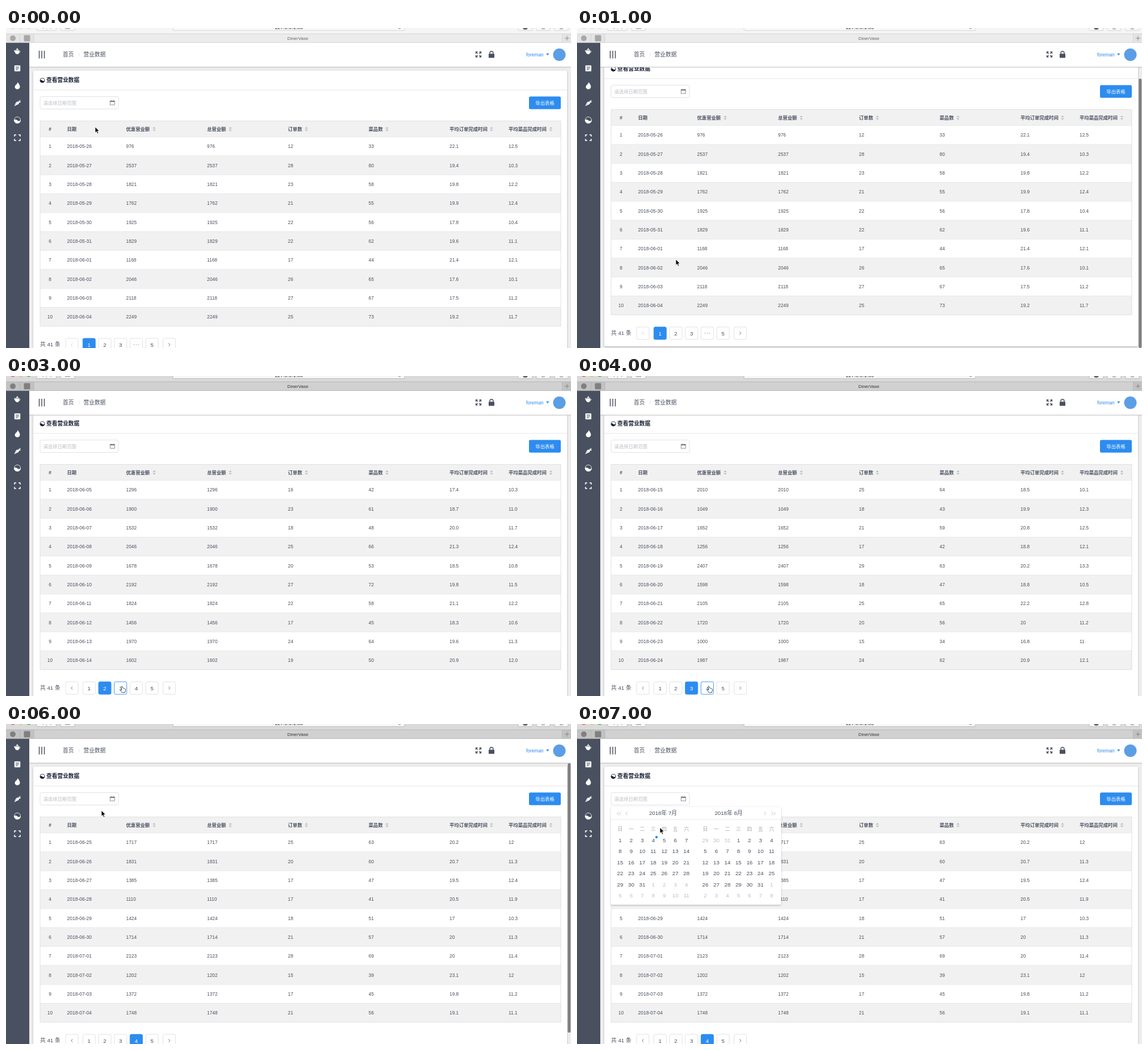
Write an HTML page that moves like this. It is 995x563 px and loops after 8000 ms.

```html
<!DOCTYPE html>
<html lang="zh">
<head>
<meta charset="utf-8">
<title>营业数据</title>
<style>
html, body { margin: 0; width: 100%; height: 100%; overflow: hidden; background: #eee; }
svg { display: block; width: 995px; height: 563px; font-family: "Liberation Sans", "Noto Sans CJK SC", "Noto Sans CJK", sans-serif; }
</style>
</head>
<body>
<svg id="stage" viewBox="0 0 995 563">
  <defs>
    <filter id="soft" x="-5%" y="-10%" width="110%" height="125%">
      <feDropShadow dx="0" dy="1" stdDeviation="1.6" flood-opacity=".28"/>
    </filter>
  </defs>
  <g id="view"></g>
</svg>
<script>
const INK = '#495060', BLUE = '#2d8cf0', PALE = '#bbbec4', LINE = '#dddee1', STRIPE = '#f1f1f1';
const SMALL = 8.36, MEDIUM = 9.72, ROW = 33.32;

// One state per second; scroll moves the page, bar is the scrollbar top.
const states = [
  { page: 1, scroll: 0, cursor: [157, 174], blurred: true },
  { page: 1, scroll: 20, cursor: [174, 407], bar: 89, blurred: true },
  { page: 1, scroll: 8, cursor: [176, 547], noIcons: true },
  { page: 2, scroll: 8, cursor: [205, 551], hand: true, hover: 3 },
  { page: 3, scroll: 8, cursor: [233, 551], hand: true, hover: 4 },
  { page: 4, scroll: -2, cursor: [202, 272], bar: 69, hoverRow: 2 },
  { page: 4, scroll: 0, cursor: [168, 152], bar: 69 },
  { page: 4, scroll: 0, cursor: [146, 182], picker: true },
];

// Columns: turnover, orders, dishes, order time, dish time.
const parse = text => text.split(';').map(row => row.trim().split(' '));
const pages = {
  1: parse('976 12 33 22.1 12.5;2537 28 80 19.4 10.3;1821 23 58 19.8 12.2;1762 21 55 19.9 12.4;1925 22 56 17.8 10.4;1829 22 62 19.6 11.1;1168 17 44 21.4 12.1;2046 26 65 17.6 10.1;2118 27 67 17.5 11.2;2249 25 73 19.2 11.7'),
  2: Array.from({ length: 10 }, (_, i) => {
    const orders = 16 + i * 7 % 12;
    return [orders * 81 + i * 37 % 90, orders, Math.round(orders * 2.65), (17.4 + i * 13 % 41 / 10).toFixed(1), (10.3 + i * 7 % 23 / 10).toFixed(1)];
  }),
  3: parse('2010 25 64 18.5 10.1;1049 18 43 19.9 12.3;1652 21 59 20.8 12.5;1256 17 42 18.8 12.1;2407 29 63 20.2 13.3;1598 18 47 18.8 10.5;2105 25 65 22.2 12.8;1720 20 56 20 11.2;1000 15 34 16.8 11;1987 24 62 20.9 12.1'),
  4: parse('1717 25 63 20.2 12;1831 20 60 20.7 11.3;1385 17 47 19.5 12.4;1110 17 41 20.5 11.9;1424 18 51 17 10.3;1714 21 57 20 11.3;2123 28 69 20 11.4;1202 15 39 23.1 12;1372 17 45 19.8 11.2;1748 21 56 19.1 11.1'),
};
const columns = [[107.5, '日期'], [211.5, '优惠营业额', 261], [354, '总营业额', 395], [496.5, '订单数', 529],
  [638.5, '菜品数', 671], [781, '平均订单完成时间', 855], [885, '平均菜品完成时间', 959.5]];

const rect = (x, y, w, h, fill, more = '') => `<rect x="${x}" y="${y}" width="${w}" height="${h}" fill="${fill}" ${more}/>`;
const path = (d, fill, more = '') => `<path d="${d}" fill="${fill}" ${more}/>`;
const stroke = (d, color, width = 1, more = '') => path(d, 'none', `stroke="${color}" stroke-width="${width}" ${more}`);
const circle = (x, y, r, fill, more = '') => `<circle cx="${x}" cy="${y}" r="${r}" fill="${fill}" ${more}/>`;
const group = (x, y, body) => `<g transform="translate(${x} ${y})">${body}</g>`;
// y is the vertical middle of the text
const text = (x, y, str, fill = INK, size = SMALL, more = '') =>
  `<text x="${x}" y="${y + size * .36}" font-size="${size}" fill="${fill}" ${more}>${str}</text>`;
const MID = 'text-anchor="middle"', BOLD = 'font-weight="bold"';
const repeat = (n, draw) => Array.from({ length: n }, (_, i) => draw(i)).join('');
const chevron = (x, y, dir, color, s = 2.2) => stroke(`M${x - dir * s / 2} ${y - s * 1.2}l${dir * s} ${s * 1.2}l${-dir * s} ${s * 1.2}`, color, .9);

const bowl = (x, y, r, color) => group(x, y, circle(0, 0, r - .4, 'none', `stroke="${color}" stroke-width=".8"`) +
  path(`M${-r} 0Q${-r / 2} ${-r * .35} 0 ${r * .1}T${r} 0A${r} ${r} 0 0 1 ${-r} 0z`, color));
const corners = (r, leg) => `M${-r} ${leg - r}V${-r}H${leg - r}M${r - leg} ${-r}H${r}V${leg - r}M${r} ${r - leg}V${r}H${r - leg}M${leg - r} ${r}H${-r}V${r - leg}`;

function browser(s) {
  const tab = s.blurred ? '#ececec' : '#d1d1d1', dim = s.blurred ? '#e4e4e4' : '#c2c2c2';
  const edge = s.blurred ? '#cfcfcf' : '#b0b0b0', field = s.blurred ? '#f8f8f8' : '#f7f7f7';
  const lights = s.blurred ? ['#dcdcdc', '#dcdcdc', '#dcdcdc'] : ['#fc5b57', '#fdbe41', '#35c84b'];
  const button = (x, w) => rect(x, -8, w, 12.5, field, `rx="2" stroke="${edge}" stroke-width=".8"`);
  return rect(0, 0, 995, 10, s.blurred ? '#f5f5f5' : '#dadada') +
    lights.map((c, i) => circle(12 + i * 14, -2.2, 3.8, c)).join('') +
    button(54, 34.5) + button(96, 25) + button(294, 408) + button(902, 25) + button(934, 24) + button(966, 24) +
    stroke('M71.300 -2V4.500', edge, .8) + stroke('M64.500 0l1.500 1.500M78 1.500l1.500-1.500M104 1H113M943 1.500H949M975 1.500H981', '#777', .9) +
    path('M910.500 0A4 3 0 0 0 918.500 0z', '#666') + stroke('M691 0A2.300 2.300 0 0 0 695 0', '#777', .9) +
    text(498, -1.2, '127.0.0.1:80', '#333', 9, MID) +
    rect(0, 10, 995, 16, tab) + rect(0, 10, 49, 16, dim) + rect(980, 10, 15, 16, dim) +
    stroke('M0 10.200H995M0 25.700H995M24.500 10V26M49 10V26M979.500 10V26', edge, .8) +
    stroke('M984 18H992M988 14V22', '#777', .8) +
    (s.noIcons ? '' : circle(12, 18, 5, s.blurred ? '#a8a8a8' : '#808080') + rect(31.5, 12.5, 11, 11, s.blurred ? '#a8a8a8' : '#808080', 'rx="1.500"')) +
    text(514, 18, 'DinerVase', s.blurred ? '#666' : '#333', 8, MID);
}

function sidebar() {
  return rect(0, 26, 41, 537, INK) +
    group(20, 41, path('M-4 -1.500H3.500Q4 5 0 5.200Q-3 5 -4 2.500L-6 -1.500L-5 -2zM-3.500 -2.300Q0 -5 3 -2.300z', '#fff') + circle(-.2, -4.4, 1, '#fff') + stroke('M3.500 -1Q6.500 0 3 3', '#fff', .9)) +
    group(20, 71, rect(-5.2, -5.2, 10.4, 10.4, '#fff', 'rx="1"') + stroke('M-3 -2.300H3M-3 0H3M-3 2.300H1', INK)) +
    group(20, 101.5, path('M.5 -6.300Q4.800 -1 4.500 2A4.500 4.300 0 0 1 -4.500 2Q-4.300 -.500 -1.500 -2.500Q.500 -4 .5 -6.300z', '#fff')) +
    group(20, 132, path('M-5.500 5.500L-2.500 -1Q0 -3.200 2 -2L2.500 -4.500L3.500 -4.300L3.300 -2.800L5 -5.500L5.800 -4.800L4 -2L6 -2.500V-1.300L3 -.500Q3.200 1.500 1 2.500z', '#fff') + stroke('M-2 -.500L-.5 1M-3.500 2L-2 3.500', INK, .7)) +
    bowl(20, 162, 6, '#fff') + group(20, 193, stroke(corners(5, 3), '#fff', 1.5));
}

function header() {
  return rect(41, 68, 954, 1.2, '#cfcfcf') + rect(41, 69.2, 954, 1.3, '#000', 'opacity=".06"') + rect(41, 26, 954, 42, '#fff') +
    stroke('M58.500 40V53.500M63 40V53.500M67.500 40V53.500', INK, 1.5) +
    text(100, 46.5, '首页', INK, MEDIUM) + text(129, 46.5, '/', LINE, MEDIUM, MID) + text(136.5, 46.5, '营业数据', INK, MEDIUM, 'font-weight="500"') +
    group(832, 46.5, stroke(corners(4.5, 3) + 'M-4.500 -4.500L-1.300 -1.300M4.500 -4.500L1.300 -1.300M4.500 4.500L1.300 1.300M-4.500 4.500L-1.300 1.300', INK, 1.3)) +
    group(855, 46.5, rect(-5, -1.3, 10, 7.3, INK, 'rx=".8"') + stroke('M-3 -1V-2.500A3 3 0 0 1 3 -2.500V-1', INK, 1.4)) +
    text(916, 47, 'foreman', BLUE, 8.4) + path('M951 44.800H956.600L953.800 48.300z', BLUE) + circle(974.5, 47, 11, '#5b9ee5');
}

function table(s) {
  const top = 163.6, body = top + 28;
  const head = rect(60, top, 917, 28, STRIPE) + text(77.5, 178, '#', INK, SMALL, MID + BOLD) +
    columns.map(([x, label, sort]) => text(x, 178, label, INK, SMALL, BOLD) +
      (sort ? path(`M${sort - 2.8} 177l2.800-3l2.800 3zM${sort - 2.8} 178.800l2.800 3l2.800-3z`, PALE) : '')).join('');
  const rows = pages[s.page].map(([turnover, ...rest], i) => {
    const y = body + i * ROW;
    const date = new Date(Date.UTC(2018, 4, 26 + (s.page - 1) * 10 + i)).toISOString().slice(0, 10);
    const fill = i === s.hoverRow ? '#eef1f2' : i % 2 ? STRIPE : '#fff';
    return rect(60, y, 917, ROW, fill) + stroke(`M60 ${y}H977`, '#e3e4e6', .8) +
      text(77.5, y + 16.8, i + 1, INK, SMALL, MID) +
      [date, turnover, turnover, ...rest].map((v, c) => text(columns[c][0], y + 16.8, v, INK, c ? SMALL : 8.5)).join('');
  }).join('');
  return head + rows + rect(60, top, 917, 361.1, 'none', `stroke="${LINE}" stroke-width=".9"`);
}

function pagination(s) {
  const y = 557;
  const box = (x, label, mode) => rect(x - 11, y - 11, 22, 22, mode === 'on' ? BLUE : '#fff', `rx="2.500" stroke="${mode ? BLUE : LINE}" stroke-width=".9"`) +
    text(x, y + .3, label, mode === 'on' ? '#fff' : mode ? BLUE : INK, MEDIUM, MID);
  return text(60, y, '共 41 条', INK, MEDIUM) +
    box(116, '') + chevron(116, y, -1, s.page === 1 ? '#ccc' : '#666') + box(287.5, '') + chevron(287.5, y, 1, '#666') +
    repeat(5, i => {
      const n = i + 1, x = 146.3 + i * 27.7, dots = s.page === 1 && n === 4;
      return box(x, dots ? '' : n, n === s.page ? 'on' : n === s.hover ? 'hover' : '') +
        (dots ? repeat(3, k => circle(x - 4 + k * 4, y, 1.1, '#ccc')) : '');
    });
}

function picker() {
  const step = 19.45;
  const month = (x, mid, m) => {
    const first = new Date(Date.UTC(2018, m, 1)).getUTCDay();
    return text(mid, 157, `2018年 ${m + 1}月`, INK, MEDIUM, MID) +
      repeat(7, i => text(x + i * step, 185, '日一二三四五六'[i], '#a5a8ad', 9, MID)) +
      repeat(42, i => {
        const day = new Date(Date.UTC(2018, m, 1 + i - first));
        return text(x + i % 7 * step, 204.5 + Math.floor(i / 7) * step, day.getUTCDate(), day.getUTCMonth() === m ? INK : PALE, MEDIUM, MID);
      });
  };
  return rect(59.5, 146, 300, 172, '#fff', 'rx="3" filter="url(#soft)"') + stroke('M59.500 168H359.500', '#e3e4e6', .8) +
    [[72, -1], [76, -1], [87.5, -1], [331.5, 1], [344, 1], [348, 1]].map(([x, dir]) => chevron(x, 157.5, dir, PALE, 2.5)).join('') +
    month(76, 151.5, 6) + month(226, 267, 7) + circle(140, 199, 2.2, BLUE);
}

function content(s) {
  return rect(48, 75, 940, 505, '#fff', 'rx="3" filter="url(#soft)"') +
    bowl(64, 92, 4.4, '#1c2438') + text(71, 92, '查看营业数据', '#1c2438', MEDIUM, BOLD) +
    stroke('M48 109H988', '#e3e4e6', .9) +
    rect(60, 120.7, 138, 21.8, '#fff', `rx="2.500" stroke="${LINE}" stroke-width=".9"`) + text(65.5, 131.5, '请选择日期范围', PALE) +
    group(187.3, 131.7, rect(-4, -3.5, 8, 7, 'none', 'stroke="#70757f" stroke-width=".8"') + stroke('M-4 -2.500H4', '#70757f', 1.7) + stroke('M-2 -4.500V-3M2 -4.500V-3', '#70757f', .8)) +
    rect(921, 120.5, 56, 22.2, BLUE, 'rx="2.500"') + text(949, 131.6, '导出表格', '#fff', SMALL, MID) +
    table(s) + pagination(s) + (s.picker ? picker() : '');
}

function cursor(s) {
  const shape = s.hand
    ? 'M-2.200 -4.500Q-1 -6 0 -4.500L1 -1.700Q2 -2.400 2.700 -1.200Q3.700 -1.700 4.200 -.600Q5.400 -.600 5.500 .800L5.200 3.200L4.200 6H-.5L-3.500 2.200Q-4.500 .500 -3 .500L-1.200 1.800z'
    : 'M0 0V10.300L2.400 8.200L4.100 12L5.800 11.200L4.200 7.500H7.300z';
  return group(...s.cursor, path(shape, s.hand ? '#fff' : '#000', `stroke="${s.hand ? '#222' : '#fff'}" stroke-width=".8" stroke-linejoin="round"`));
}

const render = s => rect(0, 0, 995, 563, '#eee') + group(0, -s.scroll, content(s)) +
  (s.bar ? rect(989.3, s.bar, 5, 474, '#7d7d7d', 'rx="2.500"') : '') +
  header() + sidebar() + browser(s) + cursor(s);

const view = document.getElementById('view');
let shown = -1;
function tick() {
  const now = Math.floor(performance.now() / 1000) % states.length;
  if (now !== shown) view.innerHTML = render(states[shown = now]);
  requestAnimationFrame(tick);
}
tick();
</script>
</body>
</html>
```
